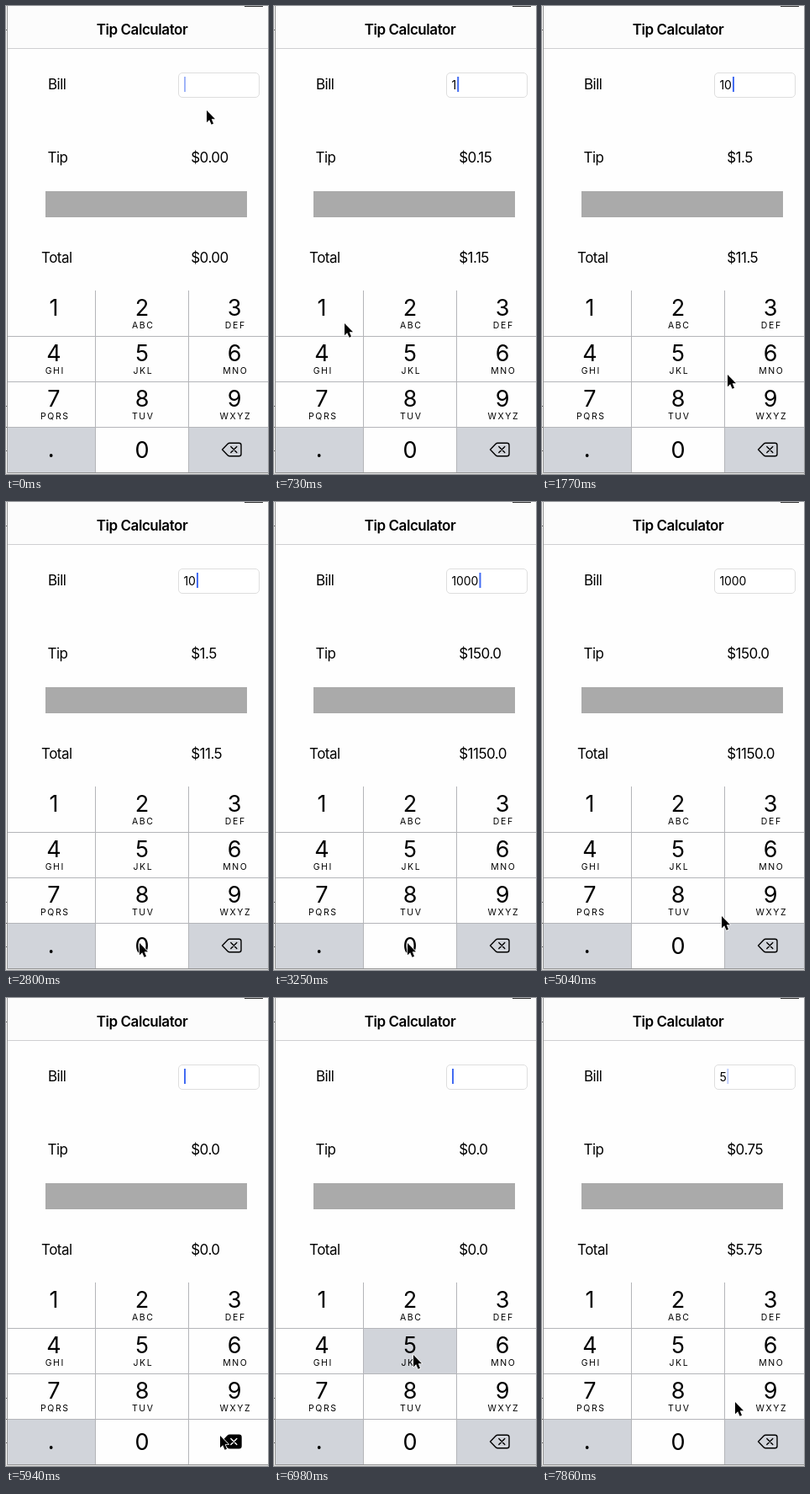
Write an HTML page that moves like this. It is 312x556 px and loops after 8000 ms.

```html
<!DOCTYPE html>
<html lang="en">
<head>
<meta charset="utf-8">
<title>Tip Calculator</title>
<style>
  html, body { margin: 0; width: 100%; height: 100%; overflow: hidden; background: #fff; }
  svg { display: block; width: 312px; height: 556px; }
  text { font: 17px Inter, Roboto, sans-serif; letter-spacing: -0.5px; fill: #000; }
  .title { font-weight: 600; letter-spacing: -0.45px; text-anchor: middle; }
  .status { font-size: 12px; letter-spacing: 0; }
  .digit { font-size: 27px; letter-spacing: 0; text-anchor: middle; }
  .letters { font-size: 10.5px; letter-spacing: 1.6px; text-anchor: middle; }
  #bill { font-size: 14px; letter-spacing: -0.1px; }
  .key { fill: #fefefe; }
  .key.side, .key.down { fill: #d1d4da; }
  .key.side.down { fill: #fefefe; }
  .erase { fill: none; stroke: #000; stroke-width: 1.4; stroke-linejoin: round; stroke-linecap: round; }
  .down + .erase .body { fill: #000; }
  .down + .erase .cross { stroke: #fff; }
</style>
</head>
<body>
<svg viewBox="0 0 312 556">
  <rect width="312" height="556" fill="#fefefe"/>
  <rect x="2" width="310" height="50" fill="#fcfcfc"/>
  <rect x="2" y="50" width="310" height="1" fill="#cfcfd1"/>
  <text class="status" x="8" y="0">Carrier</text>
  <text class="status" x="138" y="0">9:42 AM</text>
  <rect x="284" width="22" height="1" fill="#333"/>
  <text class="title" x="162" y="34">Tip Calculator</text>

  <text x="50" y="98.5">Bill</text>
  <text x="49.5" y="185.5">Tip</text>
  <text x="42" y="304.5">Total</text>
  <rect x="205.5" y="79.5" width="96" height="29" rx="4.5" fill="#fff" stroke="#dedede"/>
  <text id="bill" x="211.5" y="98.5"></text>
  <rect id="caret" y="84" width="2" height="18" fill="#426bf2"/>
  <text id="tip" x="220.2" y="185.5"></text>
  <text id="total" x="220.2" y="304.5"></text>
  <rect x="47" y="220" width="240" height="31" fill="#aaa"/>

  <g id="pad"></g>
  <path d="M106.5 338V554M217.5 338V554M2 392.5H312M2 446.5H312M2 500.5H312" stroke="#b4b5b9" fill="none"/>

  <rect y="554" width="312" height="2" fill="#e2e2e2"/>
  <path d="M1.5 0V554.5H312" stroke="#949494" fill="none"/>
  <path d="M0 28.5H1M0 475.5H1M0 500.5H1M0 528.5H1" stroke="#666"/>

  <path id="cursor" d="M0 0V14.2L3.2 11.2L5.6 16.8L8 15.8L5.7 10.3H10Z" stroke="#fff" stroke-width="1.6" paint-order="stroke" stroke-linejoin="round"/>
</svg>
<script>
const $ = id => document.getElementById(id);

// Keypad
const columns = [[2, 104, 57], [107, 110, 162], [218, 94, 272]];
const letters = ['', 'ABC', 'DEF', 'GHI', 'JKL', 'MNO', 'PQRS', 'TUV', 'WXYZ'];
const eraseIcon = `<g class="erase">
  <path class="body" d="M257.5 527L264 520.3Q265 519.3 266.4 519.3H277.5Q280 519.3 280 521.8V532.2Q280 534.7 277.5 534.7H266.4Q265 534.7 264 533.7Z"/>
  <path class="cross" d="M267.8 523.5L274.8 530.5M274.8 523.5L267.8 530.5"/></g>`;

$('pad').innerHTML = [...'123456789.0', 'del'].map((name, i) => {
  const [x, w, mid] = columns[i % 3];
  const y = 338 + 54 * Math.floor(i / 3);
  const side = name === '.' || name === 'del' ? ' side' : '';
  const box = `<rect class="key${side}" id="key-${name}" x="${x}" y="${y}" width="${w}" height="54"/>`;
  if (name === 'del') return box + eraseIcon;
  if (name === '.') return box + '<circle cx="53.7" cy="534" r="1.9"/>';
  const base = y + (name === '0' ? 36.5 : 29.5);
  return box + `<text class="digit" x="${mid}" y="${base}">${name}</text>` +
    `<text class="letters" x="${mid + 1.3}" y="${y + 45}">${letters[i] || ''}</text>`;
}).join('');

const LOOP = 8000;
const shortTicks = [0, 3, 7, 14, 17, 29, 46, 49, 52, 53];
const tickTime = k => 150 * k - 10 * shortTicks.filter(s => s < k).length;

// tick, bill text, pressed key
const steps = [
  [0, '', ''], [4, '', '1'], [5, '1', ''], [9, '1', '0'], [10, '10', ''],
  [20, '10', '0'], [21, '100', '0'], [22, '1000', ''],
  [36, '100', 'del'], [37, '10', 'del'], [38, '10', ''], [39, '1', 'del'],
  [40, '', 'del'], [41, '', ''], [47, '', '5'], [48, '5', '']
];

// tick, x, y of the pointer tip
const path = [
  [0, 239, 124], [3, 84, 377], [5, 84, 377], [8, 159, 524], [11, 159, 524],
  [12, 221, 438], [15, 221, 438], [18, 159, 524], [25, 159, 524],
  [33, 206, 505], [34, 214, 492], [36, 255, 520], [44, 255, 520],
  [47, 166, 424], [49, 166, 424], [52, 193, 450], [53, 230, 480]
];

function pointerAt(k) {
  const i = Math.max(1, path.findIndex(p => p[0] >= k));
  const [k0, x0, y0] = path[i - 1], [k1, x1, y1] = path[i];
  const u = (k - k0) / (k1 - k0), e = u * u * (3 - 2 * u);
  return [x0 + (x1 - x0) * e, y0 + (y1 - y0) * e];
}

function caretOpacity(age) {
  const p = age % 1000;
  if (p < 610) return 1;
  if (p < 790) return 1 - (p - 610) / 180;
  return p < 900 ? 0 : (p - 900) / 100;
}

const money = cents => '$' + (cents % 10 ? (cents / 100).toFixed(2) : (cents / 100).toFixed(1));
const advance = text => [...text].reduce((sum, c) => sum + (c === '1' ? 6.2 : c === '0' ? 8.75 : 8.3), 0);

let shown = -1;
function draw(k) {
  if (k === shown) return;
  shown = k;
  const past = steps.filter(s => s[0] <= k);
  const [, bill, pressed] = past[past.length - 1];
  let typed = -700, untouched = true;
  past.forEach((s, i) => {
    if (i && s[1] !== past[i - 1][1]) {
      typed = tickTime(s[0]);
      untouched = false;
    }
  });

  $('bill').textContent = bill;
  $('tip').textContent = untouched ? '$0.00' : money(bill * 15);
  $('total').textContent = untouched ? '$0.00' : money(bill * 115);
  $('caret').setAttribute('x', 212 + advance(bill));
  $('caret').setAttribute('opacity', caretOpacity(tickTime(k) - typed));
  document.querySelectorAll('.key').forEach(el =>
    el.classList.toggle('down', el.id === 'key-' + pressed));
  $('cursor').setAttribute('transform', `translate(${pointerAt(k)})`);
}

const start = performance.now();
function frame() {
  const t = (performance.now() - start) % LOOP;
  let k = 53;
  while (k && tickTime(k) > t) k--;
  draw(k);
  requestAnimationFrame(frame);
}
frame();
</script>
</body>
</html>
```
